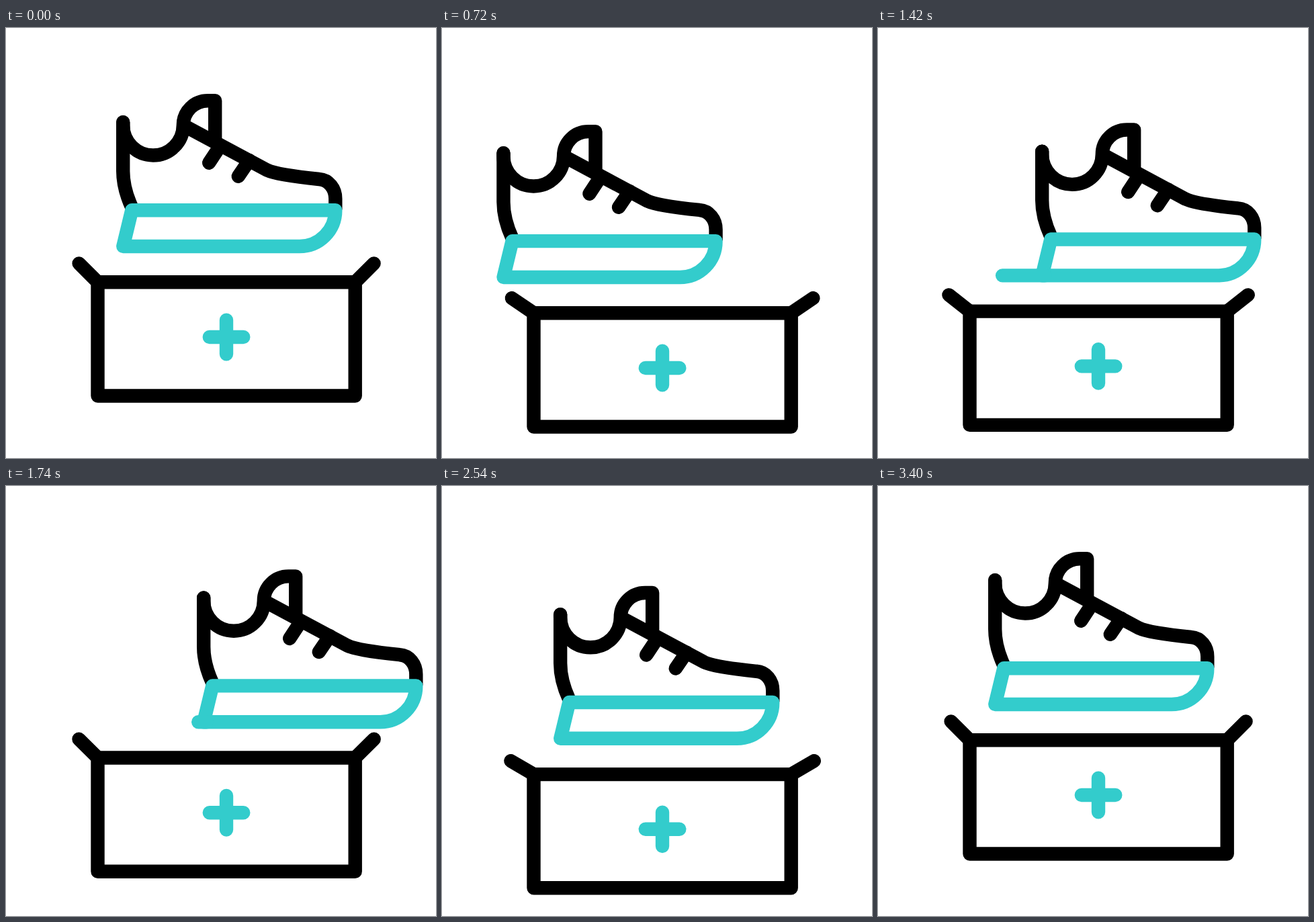
An HTML page that plays this animation: 640 by 640 pixels, repeating every 3.62 s.

```html
<!DOCTYPE html>
<html lang="en">
<head>
<meta charset="utf-8">
<title>Shoe and box</title>
<style>
  html, body { margin: 0; width: 100%; height: 100%; overflow: hidden; background: #fff; }
  svg { display: block; width: 100vw; height: 100vh; }
  path { fill: none; stroke: #000; stroke-width: 20.4; stroke-linecap: round; stroke-linejoin: round; }
  .accent { stroke: #3cc; }
  .butt { stroke-linecap: butt; }
</style>
</head>
<body>
<svg viewBox="0 0 640 640">
  <g id="scene">
    <path d="M136.5 378.3H519.7V547.5H136.5Z"/>
    <path id="flapL" d="M136.5 378.3l-27.9 -27.9"/>
    <path id="flapR" d="M519.7 378.3l27.9 -27.9"/>
    <path class="accent" d="M302.8 460H353.3M328 434.8V485.3"/>
    <g id="shoe">
      <path d="M187.3 267C179 249 174.2 232 174.2 213V140.3"/>
      <path d="M174.2 140.3V144.7A44.8 44.8 0 0 0 263.8 144.7A36.5 36.5 0 0 1 300.3 108.2H311.2V170"/>
      <path class="butt" d="M263.8 144.7L388 211.3C402 218 436 222 466 225C480.5 226 490.3 239 490.3 254V270.5"/>
      <path d="M318.5 176L302.2 200.7M362 197L345.8 220.8"/>
      <path class="accent" d="M187.3 271.2H490.3C490.3 301 466.5 325 437 325H174.3Z"/>
      <path class="accent" id="streak"/>
    </g>
  </g>
</svg>
<script>
const LOOP = 3620, STEP = 20, START = 200, STEPS = 160, SPAN = 40;
const HEEL = 174.3;
const LIFT = [0, 64, 25.6, 51.2, 0];
const SLIDE = [0, -115.2, 121.6, 0, 0];
const FLAP = [0, 15, 0, 15, 0];

const el = id => document.getElementById(id);
const scene = el('scene'), shoe = el('shoe'), streak = el('streak');
const flapL = el('flapL'), flapR = el('flapR');

const smooth = u => u * u * (3 - 2 * u);
const mix = (a, b, k) => a + (b - a) * k;

// Fast launch, soft landing: cubic bezier solved by bisection.
const cubic = (a, b, t) => 3 * (1 - t) * (1 - t) * t * a + 3 * (1 - t) * t * t * b + t * t * t;
function launch(u) {
  let lo = 0, hi = 1;
  for (let i = 0; i < 24; i++) {
    const mid = (lo + hi) / 2;
    if (cubic(0.2, 0.667, mid) < u) lo = mid; else hi = mid;
  }
  return cubic(0.57, 1, lo);
}

// The streak's tail end lags behind the heel.
const lag = u => mix(smooth(u), u, 0.42);

function draw(time) {
  const n = Math.max(0, Math.min(STEPS, Math.floor((time % LOOP - START) / STEP)));
  const leg = Math.min(3, Math.floor(n / SPAN));
  const u = n / SPAN - leg;
  const at = (keys, ease = smooth) => mix(keys[leg], keys[leg + 1], ease(u));
  const thrown = leg === 1 && u > 0;

  const x = at(SLIDE, thrown ? launch : smooth);
  const turn = at(FLAP);
  scene.setAttribute('transform', `translate(0 ${at(LIFT)})`);
  shoe.setAttribute('transform', `translate(${x} 0)`);
  flapL.setAttribute('transform', `rotate(${-turn} 136.5 378.3)`);
  flapR.setAttribute('transform', `rotate(${turn} 519.7 378.3)`);
  streak.setAttribute('d', thrown ? `M${HEEL + at(SLIDE, lag) - x} 325H${HEEL + 4}` : '');
}

const begin = performance.now();
function tick() {
  draw(performance.now() - begin);
  requestAnimationFrame(tick);
}
tick();
</script>
</body>
</html>
```
